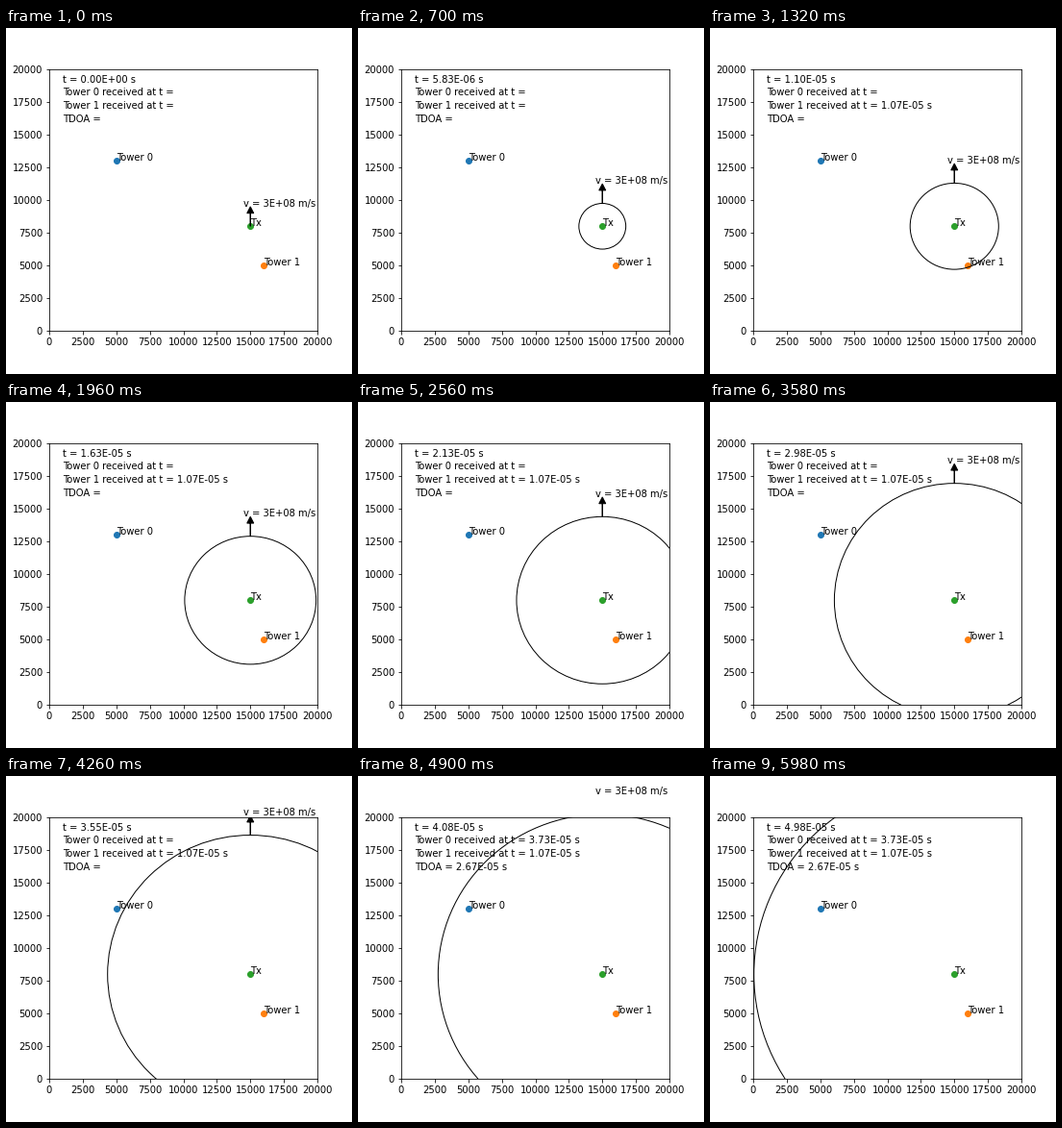
A matplotlib script that plays this animation: 360x360 px, repeating every 6 s.

```python
import numpy as np
import matplotlib.pyplot as plt
from matplotlib.animation import FuncAnimation

plt.rcParams.update({"font.family": "DejaVu Sans", "font.size": 10})

FRAMES = 300
SPAN = 5e-5            # simulated seconds per loop
SPEED = 3e8
TOWERS = np.array([[5000, 13000], [16000, 5000]])
TX = np.array([15000, 8000])

times = np.arange(FRAMES) * SPAN / FRAMES
delays = np.hypot(*(TOWERS - TX).T) / SPEED
# a signal is registered on the first time step after its arrival
received = [times[np.searchsorted(times, d)] for d in delays]

fig, ax = plt.subplots(figsize=(5, 5), dpi=72)
fig.subplots_adjust(left=0.125, right=0.9, bottom=0.125, top=0.88)
ax.set_xlim(0, 20000)
ax.set_ylim(0, 20000)

for name, (x, y) in zip(("Tower 0", "Tower 1", "Tx"), (*TOWERS, TX)):
    ax.scatter(x, y)
    ax.text(x, y, name)

wave = ax.add_patch(plt.Circle(TX, 0, fill=False, ec="k", lw=1))
arrow = ax.arrow(*TX, 0, 1000, head_width=500, head_length=500, fc="k", ec="k")
speed_label = ax.text(14500, 9500, f"v = {SPEED:.0E} m/s")
clock, *tower_labels, tdoa_label = [
    ax.text(1000, y, "") for y in (19000, 18000, 17000, 16000)
]


def seconds(value, known=True):
    return f"{value:.2E} s" if known else ""


def update(i):
    t = times[i]
    radius = SPEED * t
    top = TX[1] + radius
    wave.set_radius(radius)
    arrow.set_data(y=top)
    speed_label.set_y(top + 1500)

    clock.set_text("t = " + seconds(t))
    for n, (label, rec) in enumerate(zip(tower_labels, received)):
        label.set_text(f"Tower {n} received at t = " + seconds(rec, t >= rec))
    tdoa = received[0] - received[1]
    tdoa_label.set_text("TDOA = " + seconds(tdoa, t >= max(received)))
    return wave, arrow, speed_label, clock, *tower_labels, tdoa_label


anim = FuncAnimation(fig, update, frames=FRAMES, interval=20,
                     repeat=True, repeat_delay=0, blit=False)
plt.show()
```
